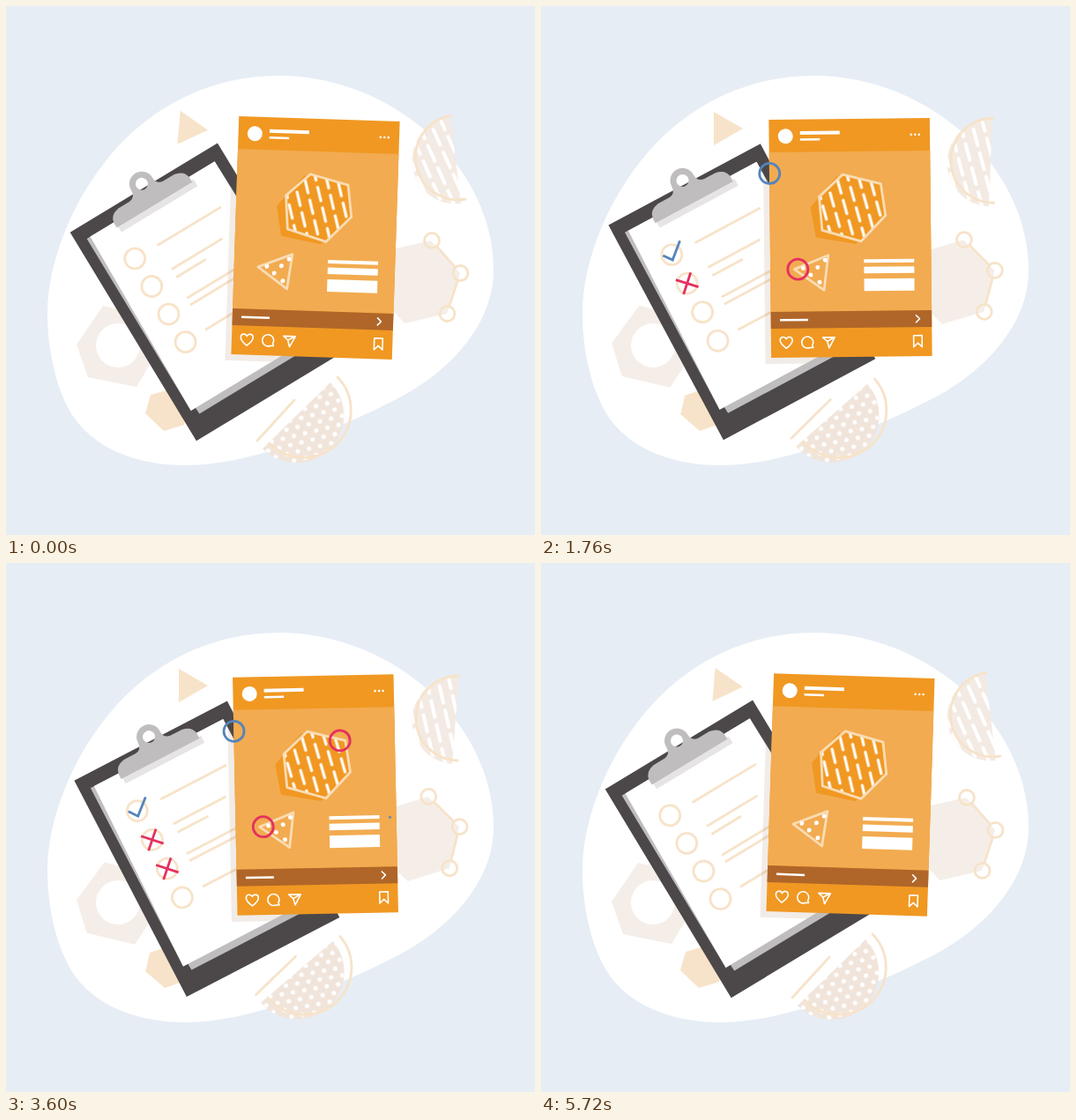
Animation of 600 by 600 pixels, one loop 5760 ms. Source, as an HTML page:

```html
<!DOCTYPE html>
<html lang="en">
<head>
<meta charset="utf-8">
<title>Checklist review</title>
<style>
html, body { margin: 0; height: 100%; overflow: hidden; background: #e6edf5; }
svg { display: block; width: 100vw; height: 100vh; }
.cream { fill: none; stroke: #f7e3c9; stroke-width: 2.8; stroke-linecap: round; stroke-linejoin: round; }
.pale { fill: #f5eee8; }
.icon { fill: none; stroke: #fff; stroke-width: 1.6; stroke-linejoin: round; stroke-linecap: round; }
.mark { fill: none; stroke-width: 2.8; stroke-dasharray: 1 2; }
</style>
</head>
<body>
<svg viewBox="0 0 600 600">
  <defs>
    <pattern id="hatch" width="24" height="24" patternUnits="userSpaceOnUse" patternTransform="translate(345 204) rotate(-15)">
      <path d="M6 3V19M18 -9V7M18 15V31" stroke="#fff" stroke-width="3.2" stroke-linecap="round"/>
    </pattern>
    <pattern id="hatchWide" width="25" height="28" patternUnits="userSpaceOnUse" patternTransform="translate(478 140) rotate(-24)">
      <path d="M6 3V22M18 -11V8M18 17V36" stroke="#fff" stroke-width="4" stroke-linecap="round"/>
    </pattern>
    <pattern id="dots" width="13" height="18" patternUnits="userSpaceOnUse" patternTransform="translate(331 464) rotate(-14)">
      <g fill="#fff"><circle cx="3" cy="4" r="2.5"/><circle cx="9.5" cy="13" r="2.5"/></g>
    </pattern>
    <clipPath id="paper"><path class="board" d="M-81 -122H84V106H-85.500Z"/></clipPath>
  </defs>

  <rect width="600" height="600" fill="#e6edf5"/>
  <path fill="#fff" d="M310 79C390 79 470 120 515 185C540 221 553 260 553 300C553 360 505 412 452 441C400 469 350 488 308 502C270 514 235 521 205 521C150 521 103 503 78 468C57 438 47 390 47 348C47 290 76 222 113 176C160 116 230 79 310 79Z"/>

  <path id="triangle" fill="#f7e3c9" d="M196 120L229 139L196 158Z"/>
  <path id="nut" class="pale" fill-rule="evenodd" d="M80 384L110 340L156 351L172 392L148 432L93 421ZM102 385a25 25 0 1 0 50 0a25 25 0 1 0 -50 0Z"/>
  <path id="gem" fill="#f7e3c9" d="M158 462L164 441L185 435L206 450L202 475L179 482Z"/>
  <g id="ringed">
    <path class="pale" d="M482 266L515 303L500 349L452 360L419 323L434 277Z"/>
    <path class="cream" d="M488.500 272.500L509.500 296.500M512.500 311L502.500 341"/>
    <g class="cream"><circle cx="483" cy="266" r="8.500"/><circle cx="515.500" cy="303" r="8.500"/><circle cx="500.500" cy="349" r="8.500"/></g>
  </g>
  <g id="slice">
    <path fill="#f3eae3" d="M504 126A49 49 0 0 0 516 224Z"/>
    <path fill="url(#hatchWide)" d="M504 126A49 49 0 0 0 516 224Z"/>
    <path class="cream" d="M504 124.500A47 47 0 0 0 521 219"/>
  </g>
  <g id="melon">
    <path fill="#f1e5db" d="M291 502A53 53 0 0 0 368 427Z"/>
    <path fill="url(#dots)" d="M291 502A53 53 0 0 0 368 427Z"/>
    <path class="cream" d="M299 496A53 53 0 0 0 376 421M285 493L327 447"/>
  </g>

  <g class="board" id="board">
    <rect x="-98" y="-138" width="195.500" height="276.500" fill="#4c4849"/>
    <path fill="#bfbdbd" d="M-85.500 -122H84L88 114H-79L-79.500 106H-85.500Z"/>
    <path fill="#fff" d="M-81 -122H84V106H-85.500Z"/>
    <path class="cream" d="M-20 -74H62M-20 -42.500H45M-20 -32H17M-22 -5.500H62M-23 3H62M-23 36H62"/>
    <g class="cream" id="boxes"></g>
    <rect x="-48" y="-117" width="101" height="9" fill="#e6e4e4"/>
    <path fill="#bfbdbd" fill-rule="evenodd" d="M-50 -115V-121Q-49 -131 -37 -133H-22Q-14 -134 -14 -143A14 14 0 0 1 14 -143Q14 -134 22 -133H37Q49 -131 50 -121V-115ZM-7 -143a7 7 0 1 0 14 0a7 7 0 1 0 -14 0Z"/>
  </g>

  <g clip-path="url(#paper)" style="mix-blend-mode:multiply">
    <rect class="card" x="253" y="135" width="182.500" height="270" fill="#f2ece8"/>
  </g>

  <g class="card" id="card">
    <rect x="259.750" y="128" width="182.500" height="270" fill="#f09822"/>
    <rect x="259.750" y="165" width="182.500" height="181" fill="#f2ab50"/>
    <rect x="259.750" y="346" width="182.500" height="19" fill="#b06629"/>
    <circle cx="278.500" cy="147" r="8.500" fill="#fff"/>
    <path stroke="#fff" stroke-width="4" d="M295 143.500H340"/>
    <path stroke="#fff" stroke-width="2.500" d="M295 151H317.500M270 355.500H302"/>
    <g fill="#fff"><circle cx="421" cy="146.500" r="1.300"/><circle cx="425.500" cy="146.500" r="1.300"/><circle cx="430" cy="146.500" r="1.300"/></g>

    <path fill="#f09822" d="M336 193L380 203L385 240L357 270L312 262L306 228Z"/>
    <path fill="#f09822" d="M343 191L386 202L391 238L363 267L319 254L316 216Z"/>
    <path fill="url(#hatch)" stroke="#fadcb4" stroke-width="2.800" stroke-linejoin="round" d="M343 191L386 202L391 238L363 267L319 254L316 216Z"/>
    <path fill="none" stroke="#fadcb4" stroke-width="2.800" stroke-linejoin="round" d="M287 298L325.500 282.500L320.500 322Z"/>
    <g fill="#fff"><circle cx="297" cy="297" r="2.500"/><circle cx="313.500" cy="296" r="2.500"/><circle cx="305.500" cy="304.500" r="2.500"/><circle cx="315.500" cy="313" r="2.500"/><circle cx="322" cy="288" r="2.500"/></g>
    <path fill="#fff" d="M366 287.500h57v4h-57zM366 296h57v7.500h-57zM366 309.500h57v14h-57z"/>

    <g class="icon">
      <path d="M424.500 351.500L428.500 355.500L424.500 359.500"/>
      <path d="M277 387.500C273 384.500 270 381.500 270 378.500C270 374 275.500 373.500 277 377C278.500 373.500 284 374 284 378.500C284 381.500 281 384.500 277 387.500Z"/>
      <path d="M306.500 384.500A6.500 6.500 0 1 0 303.500 387H307.500Z"/>
      <path d="M318.500 375.500H332L325.500 387.500L323.500 380ZM323.500 380L332 375.500"/>
      <path d="M421.500 374.500H431V387.500L426.200 383L421.500 387.500Z"/>
    </g>
  </g>
</svg>
<script>
const LOOP = 5760, BLUE = '#5584bd', PINK = '#e4315f';
const $ = id => document.getElementById(id);
const add = (parent, tag, attrs) => {
  const el = document.createElementNS('http://www.w3.org/2000/svg', tag);
  for (const k in attrs) el.setAttribute(k, attrs[k]);
  return parent.appendChild(el);
};

const BOX_X = -50.5, boxY = i => -74.5 + 36.9 * i;
for (let i = 0; i < 4; i++) add($('boxes'), 'circle', { cx: BOX_X, cy: boxY(i), r: 11.5 });

const marks = [];
const mark = (parent, colour, d, start, length, transform = '') => {
  const el = add($(parent), 'path', { class: 'mark', d, stroke: colour, pathLength: 1, transform });
  marks.push({ el, start, length });
};
const ring = (x, y, colour, start) => mark('card', colour,
  `M${x + 11.5} ${y}a11.5 11.5 0 1 1 -23 0a11.5 11.5 0 1 1 23 0`, start, 280);
const stroke = (row, colour, d, start, length) =>
  mark('board', colour, d, start, length, `translate(${BOX_X} ${boxY(row)})`);
const cross = (row, start) => {
  stroke(row, PINK, 'M-9.4 -9.6L9.4 9.6', start, 200);
  stroke(row, PINK, 'M9.4 -9L-9.4 9', start + 230, 200);
};

ring(260, 189, BLUE, 60);
stroke(0, BLUE, 'M-9.2 -4L-2 5.7L15.6 -9.6', 340, 220);
ring(291, 298, PINK, 600);
cross(1, 910);
ring(380, 202, PINK, 2440);
cross(2, 2750);
ring(423.5, 289, BLUE, 3592);
stroke(3, BLUE, 'M-9.6 -5.3L-1 4L12.6 -12.4', 3890, 220);

const clamp = v => Math.max(0, Math.min(1, v));
const spin = (id, angle, x, y) => $(id).setAttribute('transform', `rotate(${angle} ${x} ${y})`);
const pose = (cls, transform) =>
  document.querySelectorAll('.' + cls).forEach(el => el.setAttribute('transform', transform));

function draw(now) {
  const t = now % LOOP;
  const u = 1 - Math.abs(1 - 2 * t / LOOP); // linear swing there and back
  pose('board', `translate(228 324) rotate(${-31.2 + 5 * u})`);
  pose('card', `rotate(${1.88 - 4.05 * u} 351 263)`);
  spin('triangle', 5 * clamp(1 - 4 * u), 210, 139);
  spin('nut', 3 * u, 127, 385);
  spin('gem', -4 * u, 181, 459);
  spin('ringed', -6 * u, 467, 313);
  spin('slice', 15 * u, 491, 176);
  spin('melon', 5 * u, 338, 470);

  const fade = 1 - clamp((t - 5400) / 240);
  for (const { el, start, length } of marks) {
    const p = clamp((t - start) / length);
    el.style.strokeDashoffset = 1 - p;
    el.style.opacity = p > 0 ? fade : 0;
  }
  requestAnimationFrame(draw);
}
draw(performance.now());
</script>
</body>
</html>
```
